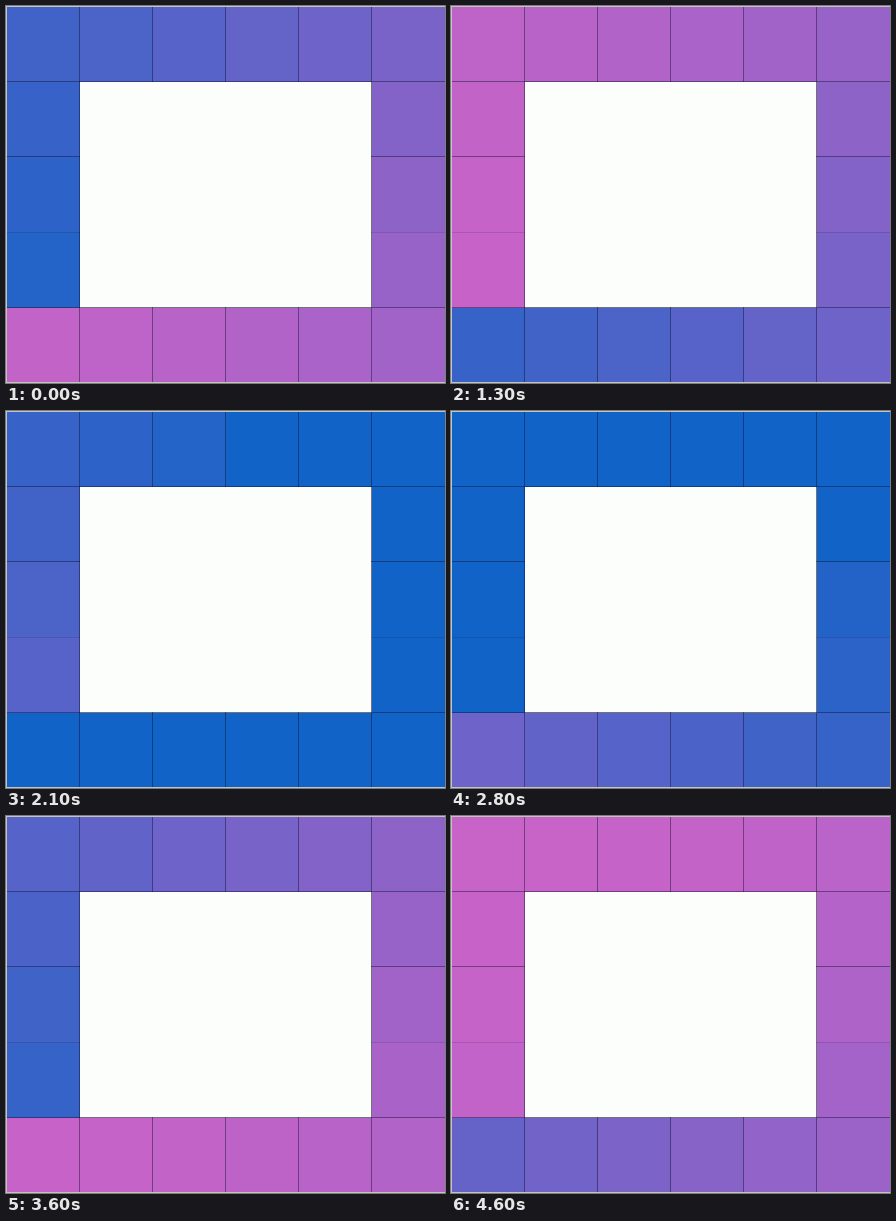
These frames come from a looping animation (439x377 px, 4.7 s). An HTML page with a canvas:

```html
<!DOCTYPE html>
<html lang="en">
<head>
<meta charset="utf-8">
<title>Colour ring</title>
<style>
html, body { margin: 0; width: 100%; height: 100%; overflow: hidden; background: #fbfefa; }
canvas { display: block; }
</style>
</head>
<body>
<canvas id="stage" width="439" height="377"></canvas>
<script>
const ctx = document.getElementById('stage').getContext('2d');
const LOOP = 4700, STEP = 100;
const HALF_WAVE = 27.75; // cells from the pink crest to the blue trough
const xs = [1, 74, 147, 220, 293, 366, 439];
const ys = [1, 76, 151, 226, 302, 376];

// Cells clockwise, from the lowest one in the left column
const ring = [[0, 3], [0, 2], [0, 1]];
for (let c = 0; c < 6; c++) ring.push([c, 0]);
for (let r = 1; r < 4; r++) ring.push([5, r]);
for (let c = 5; c >= 0; c--) ring.push([c, 4]);

// Time and ring position of the crest
const crest = [[0, 20], [600, 11], [1300, -1], [2100, -15], [2800, -25.4], [3600, -37.4], [4600, -52.2]];

function crestAt(t) {
  const k = Math.max(1, crest.findIndex(p => p[0] >= t));
  const [t0, a] = crest[k - 1], [t1, b] = crest[k];
  return a + (b - a) * (t - t0) / (t1 - t0);
}

function box(color, x, y, w, h) {
  ctx.fillStyle = color;
  ctx.fillRect(x, y, w, h);
}

function shade(distance) {
  const red = 100 + 100 * Math.cos(Math.PI * distance / HALF_WAVE);
  return `rgb(${red < 31 ? 18 : Math.round(red)}, 99, 200)`;
}

function draw(t) {
  const peak = crestAt(t);
  box('#c3c5bb', 0, 0, 439, 377);
  ring.forEach(([c, r], i) =>
    box(shade(i - peak), xs[c], ys[r], xs[c + 1] - xs[c], ys[r + 1] - ys[r]));

  const line = 'rgba(15, 15, 45, 0.45)';
  for (const x of [73, 146, 219, 292, 365]) box(line, x, 1, 1, 375);
  for (const y of [75, 150, 301]) box(line, 1, y, 438, 1);
  box('rgba(15, 15, 45, 0.15)', 1, 226, 438, 1);
  box('#fbfefa', 74, 76, 291, 225);
}

function frame(now) {
  draw(Math.floor(now % LOOP / STEP) * STEP);
  requestAnimationFrame(frame);
}
draw(0);
requestAnimationFrame(frame);
</script>
</body>
</html>
```
